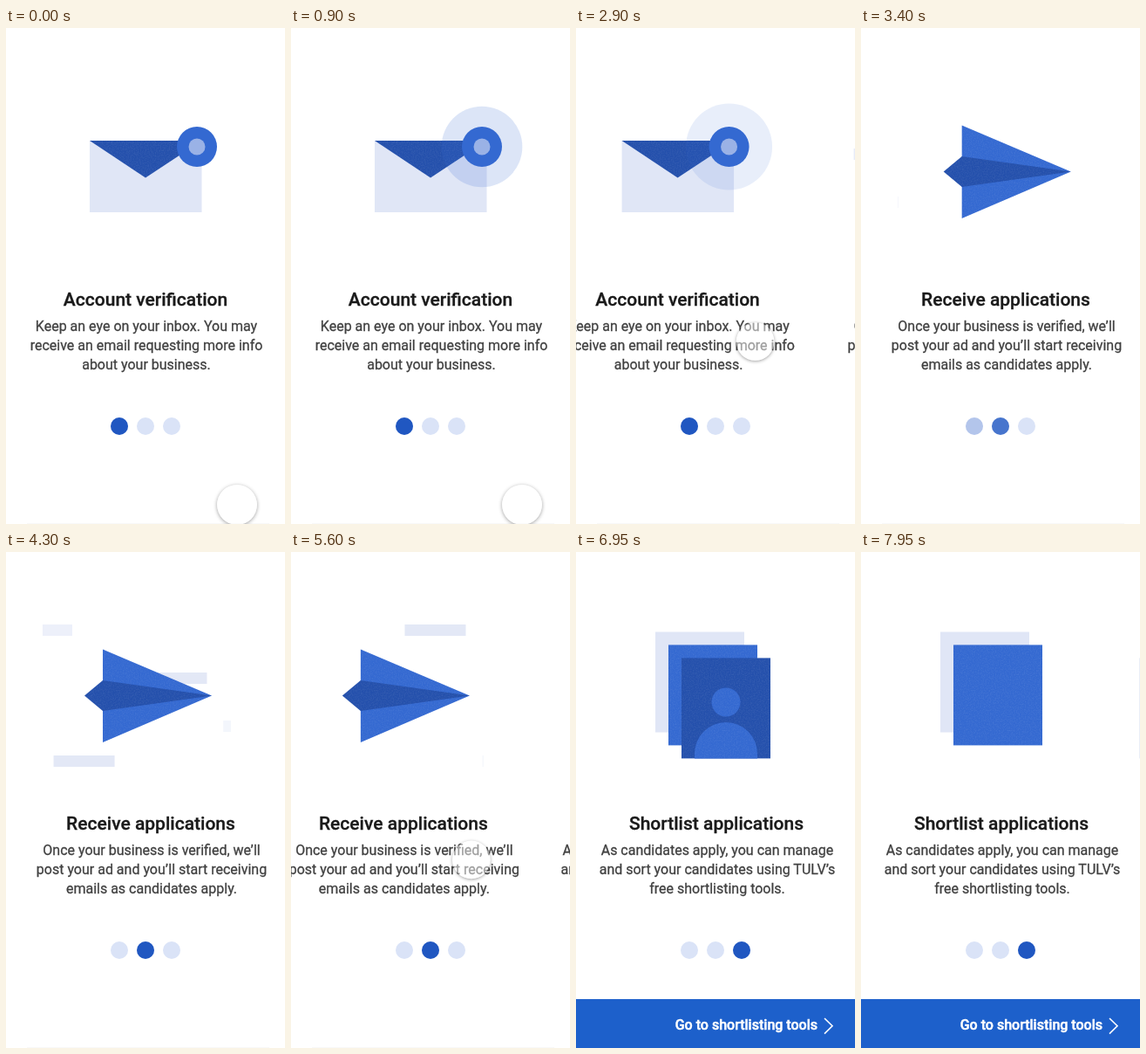
Animation of 320 by 568 pixels, one loop 8000 ms. Source, as an HTML page:

```html
<!DOCTYPE html>
<html lang="en">
<head>
<meta charset="utf-8">
<title>Onboarding carousel</title>
<style>
  html, body { margin: 0; width: 100%; height: 100%; overflow: hidden; background: #fff; }
  svg { position: absolute; left: 0; top: 0; display: block; }
  text {
    font-family: Roboto, sans-serif; text-anchor: middle; font-size: 16px;
    fill: #404040; stroke: #404040; stroke-width: .3px;
  }
  .title { font-size: 21px; font-weight: 500; fill: #1a1a1a; stroke: #1a1a1a; }
  .label { font-weight: 500; fill: #fff; stroke: #fff; stroke-width: .5px; text-anchor: end; }
  .pale { fill: #e0e6f6; }
  .mid { fill: #3469d1; }
  .deep { fill: #2450ac; }
  #touch {
    position: absolute; left: -23px; top: -23px; width: 46px; height: 46px;
    border-radius: 50%; background: rgba(255, 255, 255, .5);
    box-shadow: 0 1px 4px rgba(0, 0, 0, .38);
  }
</style>
</head>
<body>
<svg width="320" height="568" viewBox="0 0 320 568">
  <defs>
    <filter id="grain" x="0" y="0" width="1" height="1" color-interpolation-filters="sRGB">
      <feTurbulence type="fractalNoise" baseFrequency=".7" numOctaves="2" seed="4"/>
      <feColorMatrix values="0 0 0 0 1  0 0 0 0 1  0 0 0 0 1  .16 0 0 0 -.06"/>
      <feComposite in2="SourceGraphic" operator="in" result="specks"/>
      <feMerge><feMergeNode in="SourceGraphic"/><feMergeNode in="specks"/></feMerge>
    </filter>
  </defs>

  <g id="pages">
    <g class="page">
      <rect class="pale" x="96" y="129" width="128.5" height="82"/>
      <path class="deep" filter="url(#grain)" d="M96 129H224.5L160 171.5Z"/>
      <circle id="ring" class="mid" cx="219" cy="136" r="23"/>
      <circle class="mid" cx="219" cy="136" r="23"/>
      <circle cx="219" cy="136" r="9.5" fill="#9ab2e6"/>
    </g>
    <g class="page">
      <g id="streaks"></g>
      <g id="plane" filter="url(#grain)">
        <path class="mid" d="M111 111.5L236 164.5L111 218Z"/>
        <path class="deep" d="M90 164.5L111 147L236 164.5L111 182Z"/>
      </g>
    </g>
    <g class="page">
      <rect class="pale" x="91" y="91.5" width="102" height="115"/>
      <rect class="mid" filter="url(#grain)" x="106" y="106.4" width="102" height="115"/>
      <g id="card" filter="url(#grain)">
        <rect class="deep" x="121" y="121.4" width="102" height="115"/>
        <circle class="mid" cx="172" cy="172" r="16.5"/>
        <path class="mid" d="M136 236.4v-5.5a36 36 0 0 1 72 0v5.5Z"/>
      </g>
    </g>
  </g>

  <g id="dots"></g>
  <rect x="24" y="567" width="278" height="1" fill="#f8f8f8"/>
  <g id="bar">
    <rect y="512" width="320" height="57" fill="#1d60cb"/>
    <text class="label" x="277" y="547">Go to shortlisting tools</text>
    <path d="M285 534l9 8.8l-9 8.8" fill="none" stroke="#fff" stroke-width="1.6"/>
  </g>
</svg>
<div id="touch"></div>

<script>
const LOOP = 8000, WIDTH = 320, PULSE = 1880, GUST = 1865;
const $ = id => document.getElementById(id);

function add(parent, tag, attrs, content = '') {
  const el = document.createElementNS('http://www.w3.org/2000/svg', tag);
  for (const key in attrs) el.setAttribute(key, attrs[key]);
  el.textContent = content;
  return parent.appendChild(el);
}

const clamp = v => Math.min(1, Math.max(0, v));
const span = (t, from, to) => clamp((t - from) / (to - from));
const mix = (a, b, p) => a + (b - a) * p;
const quadInOut = p => p < .5 ? 2 * p * p : 1 - 2 * (1 - p) ** 2;
const cubicInOut = p => p < .5 ? 4 * p ** 3 : 1 - 4 * (1 - p) ** 3;
const cubicOut = p => 1 - (1 - p) ** 3;
const place = (el, x, y = 0) => el.setAttribute('transform', `translate(${x} ${y})`);

const copy = [
  { x: 160, title: 'Account verification', lines: [
    'Keep an eye on your inbox. You may', 'receive an email requesting more info', 'about your business.'] },
  { x: 166, title: 'Receive applications', lines: [
    'Once your business is verified, we’ll', 'post your ad and you’ll start receiving', 'emails as candidates apply.'] },
  { x: 161, title: 'Shortlist applications', lines: [
    'As candidates apply, you can manage', 'and sort your candidates using TULV’s', 'free shortlisting tools.'] },
];

document.querySelectorAll('.page').forEach((page, i) => {
  const { x, title, lines } = copy[i];
  place(page, i * WIDTH);
  add(page, 'text', { class: 'title', x, y: 318 }, title);
  lines.forEach((line, n) => add(page, 'text', { x: x + 1, y: 347 + 22 * n }, line));
});

const dots = [130, 160, 190].map(cx => {
  const dot = { cx, cy: 456, r: 10 };
  add($('dots'), 'circle', { ...dot, fill: '#dae3f7' });
  return add($('dots'), 'circle', { ...dot, fill: '#2057c1' });
});

const streaks = [
  { y: 83, start: 3420, life: 1000 },
  { y: 138, start: 3960, life: 1000 },
  { y: 193, start: 4270, life: 1000 },
  { y: 233, start: 3732, life: 800 },
].map(s => ({ ...s, el: add($('streaks'), 'rect', { class: 'pale', y: s.y, height: 13 }) }));

function drawRing(t) {
  const age = (t - 15 + PULSE) % PULSE;
  const p = clamp(age / 1025);
  $('ring').setAttribute('r', mix(23, 50, p));
  $('ring').setAttribute('opacity', mix(.85, .1, p ** .7) * (1 - span(age, 1025, 1225)));
}

function drawStreak({ el, start, life }, t) {
  const age = (t - start + 4 * GUST) % GUST;
  const head = 258 - 286 * clamp(age / life);
  const left = Math.max(42, head);
  const width = Math.max(0, Math.min(258, head + 70) - left);
  el.setAttribute('x', left);
  el.setAttribute('width', width);
  el.setAttribute('opacity', .3 + .6 * width / 70);
}

function drawTouch(t, firstDrag, secondDrag) {
  const second = t > 4000;
  const drag = second ? secondDrag : firstDrag;
  const p = second ? 1 : quadInOut(span(t, 1590, 2590));
  const q = 1 - p;
  // The approach bows slightly to the right.
  const x = second ? 244 : q * q * 265 + 2 * q * p * 273 + p * p * 249;
  const y = second ? 371 : mix(546, 378, p);
  const lift = 19 * clamp(drag / 38);
  const scale = 1 - .05 * clamp(drag / 20);
  const shown = second ? span(t, 4750, 5000) : 1;
  $('touch').style.transform = `translate(${x - drag}px, ${y - lift}px) scale(${scale})`;
  $('touch').style.opacity = shown * (1 - span(drag, 60, 170));
}

function draw(t) {
  const firstDrag = WIDTH * cubicInOut(span(t, 2710, 3300));
  const secondDrag = WIDTH * cubicInOut(span(t, 5424, 6000));
  place($('pages'), -firstDrag - secondDrag);

  drawRing(t);
  place($('plane'), 3 - 3 * Math.cos((t - 4300) / 2600 * 2 * Math.PI));
  streaks.forEach(s => drawStreak(s, t));
  place($('card'), 198.9 * quadInOut(span(t, 7400, 7950)));

  const toSecond = cubicOut(span(t, 3300, 3550));
  const toThird = cubicOut(span(t, 6000, 6250));
  [1 - toSecond, toSecond - toThird, toThird].forEach((v, i) => dots[i].setAttribute('opacity', v));
  place($('bar'), 0, 57 * (1 - toThird));

  drawTouch(t, firstDrag, secondDrag);
}

const began = performance.now();
function tick() {
  draw((performance.now() - began) % LOOP);
  requestAnimationFrame(tick);
}
tick();
</script>
</body>
</html>
```
